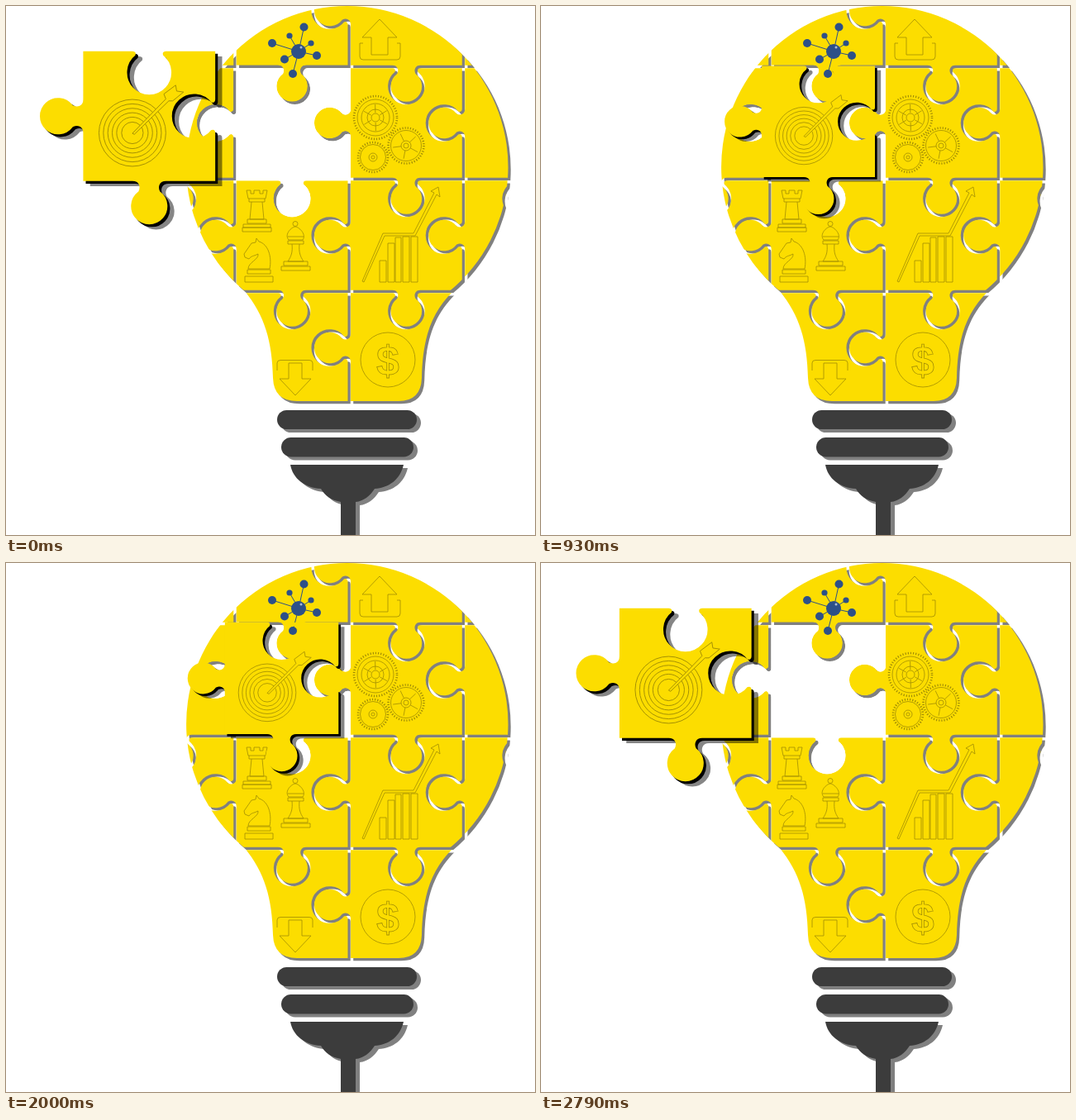
Recreate the animation shown at these times as an HTML page. Size 640x640 px, loop 2870 ms.

```html
<!DOCTYPE html>
<html lang="en">
<head>
<meta charset="utf-8">
<title>Puzzle bulb</title>
<style>
  html, body { margin: 0; width: 100%; height: 100%; overflow: hidden; background: #fff; }
  svg { display: block; width: 100vw; height: 100vh; }
  .line { fill: none; stroke: #a18d05; stroke-width: .8; }
  .teeth { stroke-width: 2.6; stroke-dasharray: 1.2 2; }
  .net { fill: #2d5088; stroke: #2d5088; }
  text { font: bold 50px "Liberation Sans", Arial, sans-serif; text-anchor: middle; }
</style>
</head>
<body>
<svg viewBox="0 0 640 640">
  <defs>
    <mask id="bulbMask" maskUnits="userSpaceOnUse" x="0" y="0" width="640" height="640">
      <path fill="#fff" d="M289 345A194.700 194.700 0 1 1 536.600 345H541C513 372 504 405 503 450Q502 478 475 478H352Q324 478 323 450C322 405 313 375 289 345Z"/>
      <path id="hole" stroke="#000" stroke-width="3.500"/>
      <path id="seams" fill="none" stroke="#000" stroke-width="3.500"/>
    </mask>
    <mask id="pieceMask" maskUnits="userSpaceOnUse" x="0" y="0" width="640" height="640">
      <path id="cell" fill="#fff" stroke="#000" stroke-width="4"/>
    </mask>
    <g id="bulb"><rect width="640" height="640" mask="url(#bulbMask)"/></g>
    <g id="piece"><rect width="640" height="640" mask="url(#pieceMask)"/></g>
    <g id="base">
      <rect x="328" y="489" width="169" height="23" rx="11.500"/>
      <rect x="333" y="522" width="160" height="23.500" rx="11.700"/>
      <path d="M344 555H481C477 573 463 583 446 584C440 593 433 599 423 600V640H405V600C394 598 386 593 381 584C362 583 347 572 344 555Z"/>
    </g>
  </defs>

  <use href="#base" fill="#808080" x="5" y="4"/>
  <use href="#base" fill="#3c3c3c"/>
  <use href="#bulb" fill="#808080" x="3.200" y="3.200"/>
  <use href="#bulb" fill="#fcdd00"/>

  <g class="line">
    <!-- arrows -->
    <path d="M452 16L473 38H462V59H442V38H431ZM432 45H428V61Q428 65 432 65H473Q477 65 477 61V45H473"/>
    <path d="M350 471L331 451H342V432H358V451H369ZM328 441V432Q328 428.500 332 428.500H367Q371 428.500 371 432V441"/>
    <!-- chess -->
    <path d="M291 223H296V227H300V223H307V227H311V223H316L314 233H293ZM294 233V237H313V233M297 237L295 258H312L310 237M292 258H315V263H292ZM287 264H320V268H287ZM286 268H321V273H286Z"/>
    <path d="M303 281L306 285C317 288 322 303 319 318H293C293 310 306 307 305 300C299 303 297 302 294 306L289 304L288 300L297 287L302 286ZM292 319H320V324H292ZM289 327H323V334H289Z"/>
    <path d="M342 283C336 276 346 267 350 267C354 267 364 276 359 283ZM341 284H360V288H341ZM346 288C347 298 345 303 341 309H360C356 303 354 298 355 288M336 309H365V314H336ZM333 315H368V320H333ZM341 279H360"/>
    <circle cx="350" cy="263.500" r="3"/>
    <!-- chart -->
    <path d="M431 333L456 275H493L518 226L514 224L523 219L525 231L521 228L495 278H458L433 334Z"/>
    <path d="M452 334V308H460V334ZM462 334V287H470V334ZM471 334V280H478V334ZM480 334V279H488V334ZM490 334V279H498V334Z"/>
    <!-- coin -->
    <circle cx="462" cy="428" r="33"/>
    <text x="462" y="446">$</text>
  </g>
  <g class="line" id="gears"></g>
  <g class="net" id="net"></g>

  <g id="mover">
    <use href="#piece" fill="#000" opacity=".47" x="7" y="5.200"/>
    <use href="#piece" fill="#000" x="2.600" y="2.600"/>
    <use href="#piece" fill="#fcdd00"/>
    <g class="line" id="target">
      <path fill="#fcdd00" d="M329 159L363 124L361 119L373 110L374 116L381 117L370 126L366 126L331 160Z"/>
    </g>
  </g>
</svg>
<script>
  const $ = id => document.getElementById(id);
  const COLS = [138.75, 277, 415.25, 553.5], ROWS = [-62.5, 73.5, 209.5, 345.5];
  const W = 138.25, H = 136;

  // One edge with a knob halfway; pt maps (along, depth) to the stage.
  function edge(pt, len, sweep) {
    const m = len / 2, at = (u, d) => pt(m + u, d).join(' ');
    return `L${at(-17, 0)}C${at(-12, 0)} ${at(-11, 4)} ${at(-12.5, 7.3)}` +
      `A20.5 20.5 0 1 ${sweep} ${at(12.5, 7.3)}` +
      `C${at(11, 4)} ${at(12, 0)} ${at(17, 0)}L${at(m, 0)}`;
  }
  const across = (x, y) => edge((u, d) => [x + u, y + d], W, 0);
  const down = (x, y) => edge((u, d) => [x - d, y + u], H, 0);
  const back = (x, y) => edge((u, d) => [x + W - u, y + d], W, 1);
  const up = (x, y) => edge((u, d) => [x - d, y + H - u], H, 1);

  let seams = '';
  for (const x of COLS) for (const y of ROWS) {
    if (y > 0) seams += `M${x} ${y}` + across(x, y);
    if (x > 200) seams += `M${x} ${y}` + down(x, y);
  }
  $('seams').setAttribute('d', seams);

  const [, L, R] = COLS, [, T, B] = ROWS;
  const cell = `M${L} ${T}` + across(L, T) + down(R, T) + back(L, B) + up(L, T) + 'Z';
  $('hole').setAttribute('d', cell);
  $('cell').setAttribute('d', cell);

  const ring = (x, y, r, cls = '') => `<circle cx="${x}" cy="${y}" r="${r}" class="${cls}"/>`;

  const rings = [34, 29.5, 25, 20.5, 16, 11].map(r => ring(329, 158.5, r)).join('');
  $('target').insertAdjacentHTML('afterbegin', rings);

  function gear(x, y, r, inner, spokes) {
    let s = ring(x, y, r, 'teeth') + inner.map(q => ring(x, y, q)).join('');
    for (let i = 0; i < spokes; i++) {
      const a = i * 2 * Math.PI / spokes + .5, c = Math.cos(a), n = Math.sin(a);
      s += `<path d="M${x + 6 * c} ${y + 6 * n}L${x + 16 * c} ${y + 16 * n}"/>`;
    }
    return s;
  }
  $('gears').innerHTML = gear(447, 135, 26, [22, 17, 10, 5], 6) +
    gear(484, 169, 21.5, [18.5, 6, 3], 5) + gear(444, 183, 18, [15.5, 5, 2], 0);

  const nodes = [[322, 45, 5], [343, 36, 3.6], [360.5, 25.5, 5], [369, 45, 3.6],
    [376, 60, 5], [337, 64.5, 5], [347, 82, 5]];
  $('net').innerHTML = nodes.map(([x, y, r]) =>
    `<path d="M354 55L${x} ${y}"/><circle cx="${x}" cy="${y}" r="${r}" stroke="none"/>`).join('') +
    '<circle cx="354" cy="55" r="9" stroke="none"/><circle cx="357" cy="50" r="1.500" fill="#a9bbd6" stroke="none"/>';

  // Ease with handles (.43, 0) and (.025, 1).
  function ease(u) {
    let lo = 0, hi = 1, s;
    for (let i = 0; i < 24; i++) {
      s = (lo + hi) / 2;
      const x = 1.29 * s * (1 - s) ** 2 + .075 * s * s * (1 - s) + s ** 3;
      if (x < u) lo = s; else hi = s;
    }
    return s * s * (3 - 2 * s);
  }

  // Steps of 70 ms, every seventh one 80 ms.
  const LOOP = 2870;
  function stepAt(t) {
    const q = t + 210;
    return Math.min(39, 7 * Math.floor(q / 500) + Math.min(6, Math.floor(q % 500 / 70)) - 3);
  }

  const mover = $('mover'), start = performance.now();
  function draw(now) {
    const step = stepAt(Math.max(0, now - start) % LOOP);
    const u = Math.max(0, 1 - Math.abs(step - 20.25) / 20);
    const p = u > 0 ? ease(u) : 0;
    const x = 153.5 + 176.5 * p, y = 153.5 + 5 * p ** 5;
    const size = 1 + .19 * (1 - p ** 1.7);
    mover.setAttribute('transform', `translate(${x} ${y}) scale(${size}) translate(-329.5 -158.5)`);
    requestAnimationFrame(draw);
  }
  draw(start);
</script>
</body>
</html>
```
